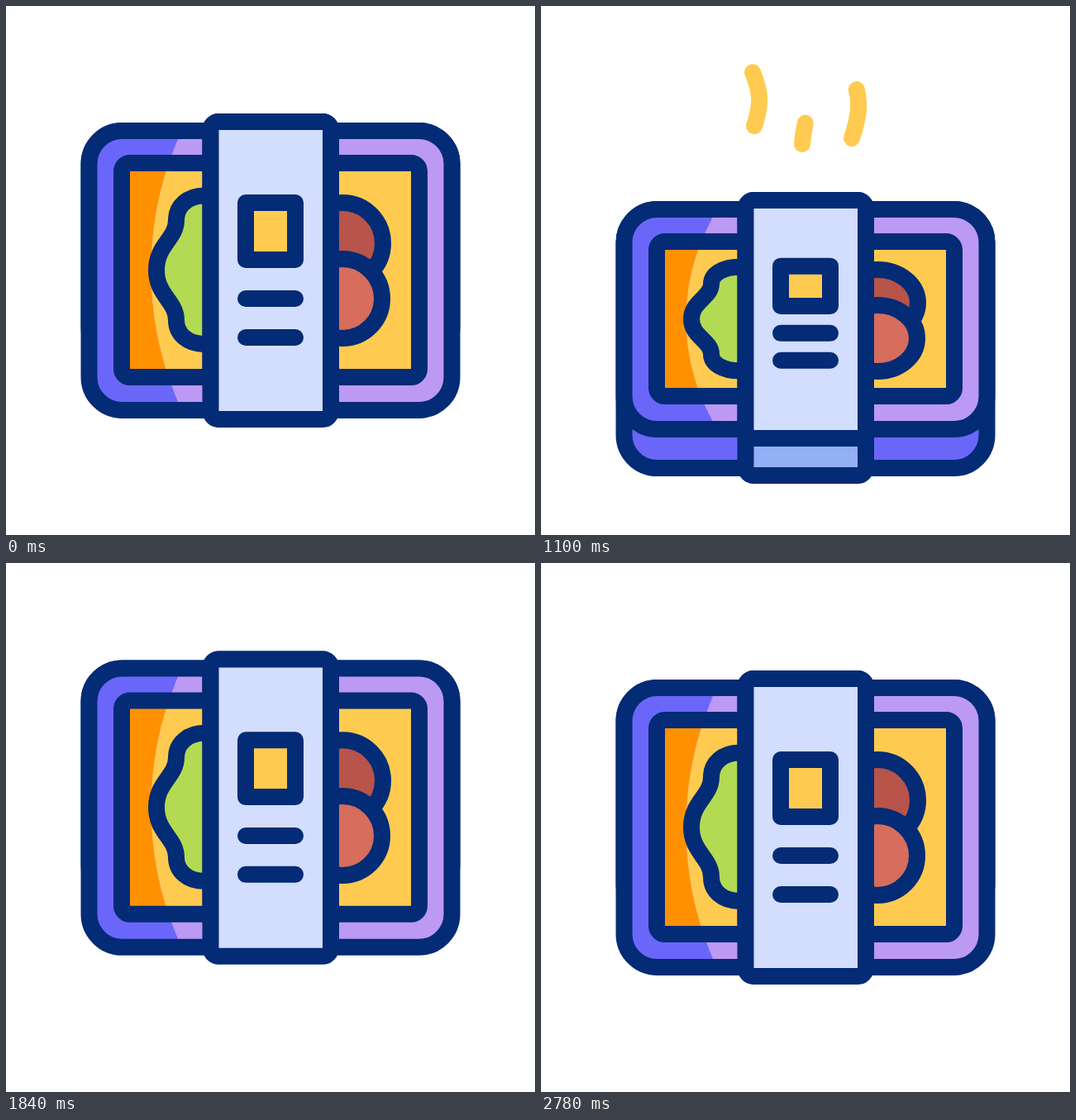
Write an HTML page without scripts that moves like this. It is 640x640 px and loops after 2980 ms.

```html
<!DOCTYPE html>
<html lang="en">
<head>
<meta charset="utf-8">
<title>Lunch box</title>
<style>
  /* --y: vertical travel in px, --p: 0 = seen from above, 1 = tilted */
  @property --y { syntax: "<number>"; inherits: true; initial-value: 0; }
  @property --p { syntax: "<number>"; inherits: true; initial-value: 0; }

  html, body { margin: 0; width: 100%; height: 100%; overflow: hidden; background: #fff; }
  svg {
    display: block; width: 640px; height: 640px;
    animation: travel 2980ms infinite, tilt 2980ms infinite;
  }

  @keyframes travel {
    0%, 6.71% { --y: 0; animation-timing-function: cubic-bezier(.45, 0, .75, .7); }
    11.41% { --y: -18; animation-timing-function: cubic-bezier(.3, .5, .6, 1); }
    14.77% { --y: -26; animation-timing-function: cubic-bezier(.4, 0, .75, .65); }
    25.5% { --y: 32; animation-timing-function: cubic-bezier(.2, .6, .6, .8); }
    36.91% { --y: 59; animation-timing-function: cubic-bezier(.4, .4, .6, 1); }
    44.97% { --y: 73; animation-timing-function: cubic-bezier(.4, 0, .7, .6); }
    54.36% { --y: 28.5; animation-timing-function: cubic-bezier(.3, .4, .6, 1); }
    63.76% { --y: -27; animation-timing-function: cubic-bezier(.4, 0, .7, .8); }
    70.47% { --y: 19; animation-timing-function: cubic-bezier(.3, .6, .6, 1); }
    72.82% { --y: 27; animation-timing-function: ease-in-out; }
    93.29%, 100% { --y: 0; }
  }
  @keyframes tilt {
    0%, 20.1% { --p: 0; animation-timing-function: cubic-bezier(.4, 0, .8, .8); }
    25.5% { --p: .575; animation-timing-function: cubic-bezier(.2, .5, .6, 1); }
    31%, 53% { --p: 1; animation-timing-function: ease-in; }
    54.36% { --p: .93; animation-timing-function: cubic-bezier(.35, .3, .6, 1); }
    62.4%, 100% { --p: 0; }
  }
  @keyframes rise {
    0%, 30.87% { stroke-dashoffset: 101; }
    41.61% { stroke-dashoffset: 0; }
    49.66%, 100% { stroke-dashoffset: -101; }
  }

  .box { transform: translateY(calc(var(--y) * 1px)); }
  .line { stroke: #042b75; stroke-width: 20; stroke-linejoin: round; stroke-linecap: round; }
  .lid, .base { x: 100.5px; width: 439px; rx: 40px; }
  .lid { y: calc(-169px + 36px * var(--p)); height: calc(338px - 72px * var(--p)); }
  .base { y: calc(-169px + 36px * var(--p)); height: calc(277px + 36px * var(--p)); }
  .tray {
    x: 140px; width: 360px; rx: 10px;
    y: calc(-130px + 36px * var(--p)); height: calc(259px - 72px * var(--p));
  }
  .band, .fold { x: 247.5px; width: 145.5px; rx: 10px; }
  .band { y: calc(-180px + 36px * var(--p)); height: calc(360px - 72px * var(--p)); }
  .fold { y: calc(-180px + 36px * var(--p)); height: calc(312px + 21px * var(--p)); }
  .shine { ry: calc(405px - 89px * var(--p)); }
  .slice-back { cy: calc(-33px + 13px * var(--p)); ry: calc(49px - 9px * var(--p)); }
  .slice-front { cy: calc(34px - 11px * var(--p)); ry: calc(48px - 8px * var(--p)); }
  .squash { transform: translateY(calc(-7px * var(--p) * var(--lift, 0))) scaleY(calc(1 - .3 * var(--p))); }
  .squash > * { vector-effect: non-scaling-stroke; }
  .label { --lift: 1; }

  .steam path {
    stroke-dasharray: 100 400;
    animation: rise 2980ms linear var(--wait, 0ms) infinite both;
  }
</style>
</head>
<body>
<svg viewBox="0 -320 640 640">
  <clipPath id="lit"><ellipse class="shine" cx="580.5" cy="0" rx="405"/></clipPath>

  <g class="steam" fill="none" stroke="#fecb50" stroke-width="20" stroke-linecap="round">
    <path pathLength="100" d="M258-175C267-202 266-215 256-240C250-258 250-272 256-291"/>
    <path pathLength="100" style="--wait:16ms" d="M376-160C385-188 386-200 382-218C376-240 377-255 385-275"/>
    <path pathLength="100" style="--wait:124ms" d="M316-153Q317-167 320-179C328-205 326-215 320-235C314-255 314-275 320-300"/>
  </g>

  <g class="box">
    <rect class="base line" fill="#6b66fa"/>
    <rect class="lid" fill="#6b66fa"/>
    <rect class="tray" fill="#ff9100"/>
    <g clip-path="url(#lit)">
      <rect class="lid" fill="#bc99f2"/>
      <rect class="tray" fill="#fecb50"/>
    </g>
    <g class="line" fill="none">
      <rect class="lid"/>
      <rect class="tray"/>
    </g>

    <g class="squash line">
      <path fill="#b3da53" d="M240-90.5C220-90.5 206-78 206-61C206-38 182-31 182-.5C182 30 206 37 206 60C206 77 220 89 240 89"/>
    </g>
    <ellipse class="slice-back line" cx="407" rx="49" fill="#b8544a"/>
    <ellipse class="slice-front line" cx="407" rx="48" fill="#d66d5d"/>

    <rect class="fold line" fill="#92b0f3"/>
    <rect class="band line" fill="#d3ddfe"/>
    <g class="squash label line">
      <rect x="290" y="-82" width="60" height="69" fill="#fecb50"/>
      <path d="M290 34H350"/>
      <path d="M290 81H350"/>
    </g>
  </g>
</svg>
</body>
</html>
```
